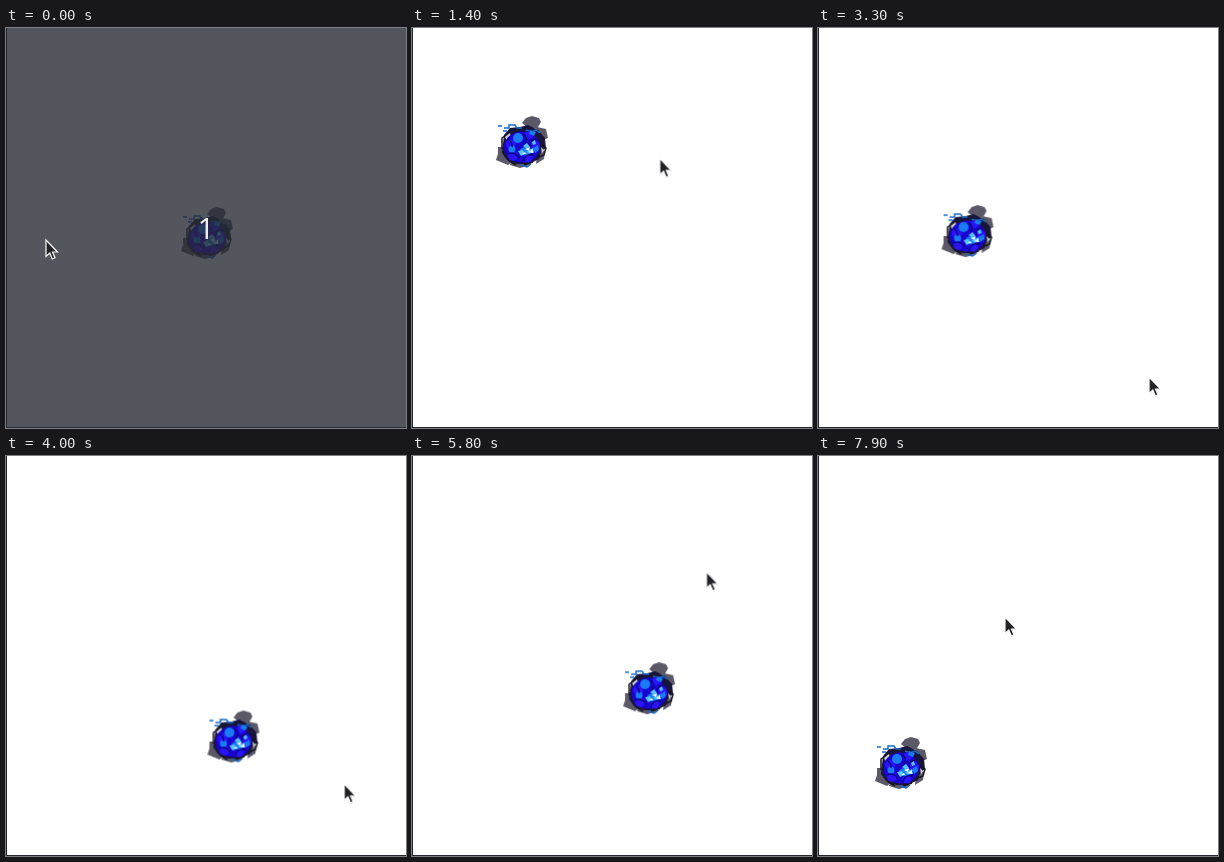
Recreate the animation shown at these times as an HTML page. Size 400 px wide and 400 px high, loop 8000 ms.

```html
<!DOCTYPE html>
<html lang="en">
<head>
<meta charset="utf-8">
<title>Blue flame chase</title>
<style>
  html, body { margin: 0; width: 100%; height: 100%; overflow: hidden; background: #fff; }
  svg { display: block; width: 100vw; height: 100vh; }
  #blob, #cursor { animation: 8s linear infinite; }
  #blob { animation-name: chase; }
  #cursor { animation-name: point; }
  #idle { animation: idle 8s step-end infinite; }
  #burst { animation: burst 8s linear infinite; transform-origin: 358px 210px; }
  #veil { animation: veil 8s step-end infinite; }

  @keyframes chase {
    0%, 7.25% { transform: translate(201px, 205px); }
    17.5% { transform: translate(110px, 114px); }
    23.1%, 31.2% { transform: translate(60px, 114px); }
    53% { transform: translate(254px, 307px); }
    59.9%, 68.1% { transform: translate(314px, 307px); }
    78.6%, 81.24% { transform: translate(131px, 129px); }
    81.25%, 88.1% { transform: translate(354px, 207px); }
    91.8% { transform: translate(254px, 307px); }
    98.1%, 100% { transform: translate(83px, 307px); }
  }
  @keyframes point {
    0% { transform: translate(40px, 212px); }
    3.75%, 6% { transform: translate(57px, 112px); }
    10% { transform: translate(106px, 143px); }
    13.75% { transform: translate(170px, 78px); }
    16.25% { transform: translate(210px, 100px); }
    20% { transform: translate(322px, 190px); }
    25%, 26.3% { transform: translate(316px, 286px); }
    27.5%, 30.6% { transform: translate(317px, 306px); }
    36.2% { transform: translate(351px, 345px); }
    41.25% { transform: translate(331px, 349px); }
    46.25% { transform: translate(352px, 335px); }
    52.5% { transform: translate(329px, 323px); }
    58.75% { transform: translate(288px, 195px); }
    62.5%, 64.4% { transform: translate(120px, 84px); }
    65%, 67.5% { transform: translate(120px, 87px); }
    75% { transform: translate(381px, 130px); }
    78.75% { transform: translate(370px, 160px); }
    83.75% { transform: translate(357px, 207px); }
    86.25%, 87.5% { transform: translate(345px, 312px); }
    88.75% { transform: translate(300px, 322px); }
    91.9% { transform: translate(84px, 302px); }
    98.75%, 100% { transform: translate(187px, 161px); }
  }
  @keyframes idle {
    0% { opacity: 1; }
    81.25% { opacity: 0; }
    85.7%, 100% { opacity: 1; }
  }
  @keyframes burst {
    0%, 81.24% { opacity: 0; transform: scale(.75); }
    81.25% { opacity: 1; transform: scale(.75); }
    83.6%, 85.69% { opacity: 1; transform: none; }
    85.7%, 100% { opacity: 0; transform: none; }
  }
  @keyframes veil {
    0% { opacity: 1; }
    1.25%, 100% { opacity: 0; }
  }
</style>
</head>
<body>
<svg viewBox="0 0 400 400">
  <defs>
    <g id="lobe">
      <circle r="9" fill="#0b0a4a"/>
      <circle r="8" fill="#1608dc"/>
      <ellipse cx="-1" cy="-1" rx="5" ry="5.5" fill="#1768f4"/>
      <path d="M-4-2l3-3 2 3-2 4zM1 2l3-3 1 3-2 3z" fill="#31a5ff"/>
      <path d="M-2-2l2-1 1 2-2 1z" fill="#b4e6ff"/>
    </g>
  </defs>
  <rect width="400" height="400" fill="#fff"/>
  <path d="M0 399.5H400" stroke="#22252c"/>

  <g id="blob">
    <g id="idle">
      <g fill="#5b5968">
        <path d="M0-19L4-24 10-26 17-24 19-20 15-13 5-15z"/>
        <path d="M15-15l9 2 2 9-7 3-6-6z"/>
        <path d="M-24 5l8 0 7 14-5 4-12-5 2-6z"/>
        <path d="M-10 17l16-1 2 7-10 3-10-3z"/>
        <path d="M16 6l7 3-1 8-8 5z"/>
      </g>
      <path d="M-18-7l6-7 10-1 8-2 10 5 7 8 1 10-5 4-2 7-10 5-12 0-10-4-5-7 1-9z" fill="#171539"/>
      <path d="M-20 7v-11l8-6M19 2l5 4-2 7-5 2M-14 18l8 5M2 23l9-3" fill="none" stroke="#15151d" stroke-width="1.5"/>
      <path d="M-17-5l5-4 1 4-4 4zM19 5l3 3-2 3z" fill="#fff" opacity=".8"/>
      <path d="M-24-16h4M-18-14h5v-3h6l2 3h5M-19-11h4M4-12l5 2 5-2 4 3M-1 23l6 2 4-3M-14 13l3 4" fill="none" stroke="#176ac7" stroke-width="1.5"/>
      <ellipse cy="5" rx="18" ry="15.5" fill="#1903cf"/>
      <g fill="#2b13ff">
        <circle cx="-11" cy="2" r="5"/>
        <circle cx="7" cy="-7" r="4"/>
        <circle cx="13" cy="4" r="5"/>
        <circle cx="-9" cy="14" r="5"/>
        <circle cx="6" cy="16" r="4.5"/>
      </g>
      <g fill="#187cf5">
        <circle cx="-4" cy="-4" r="5"/>
        <circle cx="-10" cy="7" r="3.5"/>
        <ellipse cx="4" cy="9" rx="6" ry="4"/>
        <path d="M8-12l6 2-2 4-5-2zM11 6l5-3 1 5-4 3z"/>
      </g>
      <g fill="none" stroke="#080068" stroke-width="1.3">
        <path d="M-14-3q5 4 4 8M1-8q6 3 2 9M14-3q-8 2-5 8M-14 12q7-3 11 4M2 19q1-8 10-6"/>
      </g>
      <path d="M1 4l4-3 3 4-4 1zM4 10l7-4 1 5-5 0zM-4 9l5-1 2 4-4 2zM10 0l3-2 1 4-3 1z" fill="#55c8ff"/>
      <path d="M3 7l5-2-1 4zM7 10l4-3 0 4zM0 12l3-2 1 2z" fill="#f4fdff"/>
    </g>
  </g>

  <g id="burst">
    <g fill="#24242f">
      <path d="M342 189l-8 9-2 15 5 12 8 7 2-35z"/>
      <path d="M366 180l6-4 7 5 0 9-6 6-6-4z"/>
      <path d="M347 235l12 2 4 4-8 4-5-3z" fill="#5b5968"/>
      <path d="M374 198l9 5 2 9-8 9zM366 173l6-2-4 4z"/>
    </g>
    <path d="M343 181l2 4M326 195l2 4M331 193l2 3M382 176l1 3M385 178v2M333 239l3 2M336 180h2M345 241l4 2M374 236l2-3M365 178l3-4 5-1M380 188l3-3" stroke="#29293b" stroke-width="1.5"/>
    <use href="#lobe" transform="translate(372 185) scale(.65)"/>
    <use href="#lobe" transform="translate(360 231) scale(.7)"/>
    <use href="#lobe" transform="translate(350 225) scale(.8)"/>
    <use href="#lobe" transform="translate(370 226) scale(.85)"/>
    <use href="#lobe" transform="translate(364 196) scale(.65)"/>
    <use href="#lobe" transform="translate(353 196) scale(1.05)"/>
    <use href="#lobe" transform="translate(342 212) scale(1.1)"/>
    <use href="#lobe" transform="translate(376 207)"/>
    <path d="M352 208l7-4 7 3 2 10-5 6-9-1-3-7z" fill="#fff"/>
    <path d="M351 212l2-6 7-2 6 4" fill="none" stroke="#17152d" stroke-width="2.5"/>
  </g>

  <g id="veil">
    <rect x="1" width="399" height="400" fill="#282c34" opacity=".8"/>
    <text x="200" y="211" text-anchor="middle" font-family="'Open Sans', sans-serif" font-size="30" fill="#f0f0f0">1</text>
  </g>
  <path d="M.5 0V400" stroke="#22252c"/>

  <g id="cursor">
    <path d="M0 1V17.500L3.800 14 6.500 20 9.500 18.700 7 13H12z" fill="#000" opacity=".18"/>
    <path d="M0 0V16.500L3.800 13 6.300 19 9 17.800 6.500 12H11.500z" fill="#222226" stroke="#fff" stroke-width="1.200"/>
  </g>
</svg>
</body>
</html>
```
